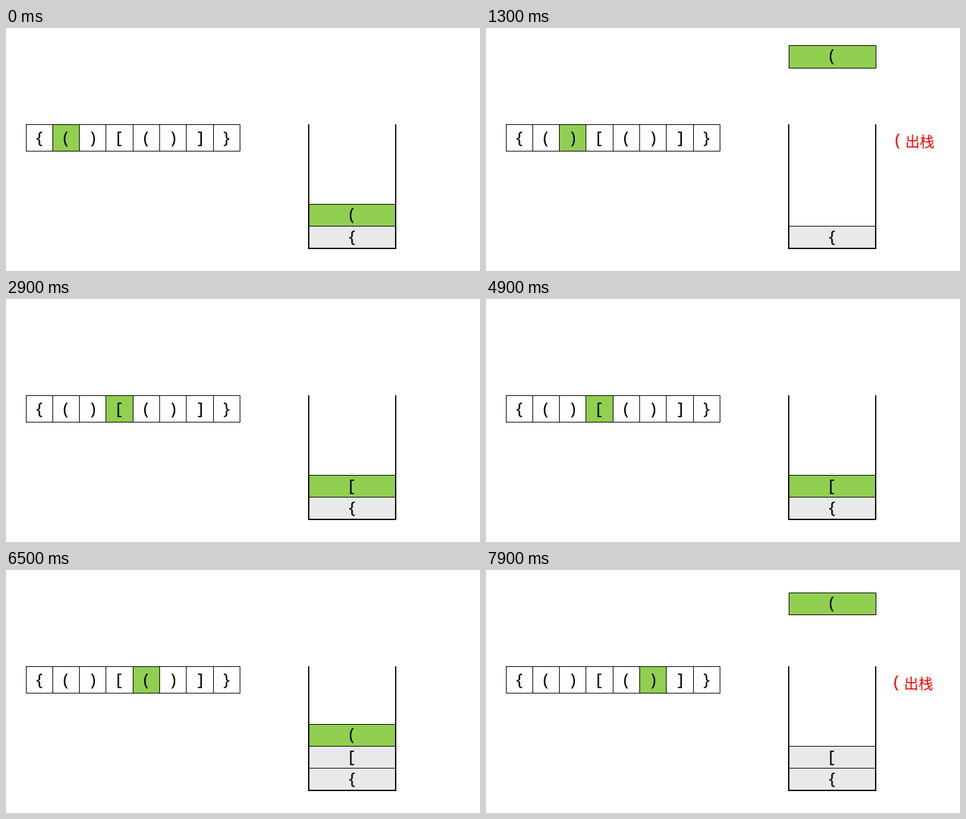
An HTML page with a canvas for the animation above (8000 ms loop, 714x366 px).

```html
<!DOCTYPE html>
<html lang="zh-CN">
<head>
<meta charset="utf-8">
<style>
  html, body { margin: 0; width: 100%; height: 100%; overflow: hidden; background: #fff; }
  canvas { display: block; }
</style>
</head>
<body>
<canvas id="stage" width="714" height="366"></canvas>
<script>
const ctx = document.getElementById('stage').getContext('2d');
const LOOP = 8000, GREEN = '#90cf50', GREY = '#e9e9e9';
const input = '{()[()]}';

// Each step: start time, highlighted input cell, stack (bottom first), popped item
const steps = [
  { at: 0, cell: 1, stack: '{(' },
  { at: 500, cell: 2, stack: '{', popped: '(', top: 26, height: 34, labelX: 620.5 },
  { at: 2900, cell: 3, stack: '{[' },
  { at: 5100, cell: 4, stack: '{[(' },
  { at: 7300, cell: 5, stack: '{[', popped: '(', top: 34, height: 33, labelX: 618.5 },
];

function box(x, y, w, h, fill) {
  ctx.fillStyle = fill;
  ctx.fillRect(x + .5, y + .5, w, h);
  ctx.lineWidth = 1;
  ctx.strokeRect(x + .5, y + .5, w, h);
}

// Centre the visible ink of a bracket on (x, y)
function bracket(char, x, y, color = '#000') {
  ctx.font = '500 26px "Noto Sans", sans-serif';
  ctx.fillStyle = color;
  const m = ctx.measureText(char);
  ctx.fillText(char,
    x + (m.actualBoundingBoxLeft - m.actualBoundingBoxRight) / 2,
    y + (m.actualBoundingBoxAscent - m.actualBoundingBoxDescent) / 2);
}

function drawInput(active) {
  const edge = i => 30 + Math.floor(40.3 * i);
  [...input].forEach((char, i) => {
    box(edge(i), 145, edge(i + 1) - edge(i), 40, i === active ? GREEN : '#fff');
    bracket(char, 50.2 + 40.3 * i, 167);
  });
}

function drawStack({ stack, popped }) {
  [...stack].forEach((char, i) => {
    const y = 298 - 33 * i;
    const isNew = !popped && i === stack.length - 1;
    box(456, y, 130, 33, isNew ? GREEN : GREY);
    bracket(char, 521.3, y + 17.5);
  });
  ctx.lineWidth = 1.8;
  ctx.beginPath();
  ctx.moveTo(456, 145);
  ctx.lineTo(456, 332);
  ctx.lineTo(587, 332);
  ctx.lineTo(587, 145);
  ctx.stroke();
}

function drawPopped({ popped, top, height, labelX }) {
  box(456, top, 131, height, GREEN);
  bracket(popped, 521.3, top + 17.5);
  bracket(popped, labelX, 170.5, '#f00');
  ctx.font = '22px "Noto Sans CJK SC", "Noto Sans CJK", sans-serif';
  ctx.fillText('出栈', labelX + 11, 179);
}

function draw(now) {
  const time = now % LOOP;
  const step = steps.findLast(s => s.at <= time);
  ctx.fillStyle = '#fff';
  ctx.fillRect(0, 0, 714, 366);
  ctx.strokeStyle = '#000';
  drawInput(step.cell);
  drawStack(step);
  if (step.popped) drawPopped(step);
}

const start = performance.now();
(function tick() {
  draw(performance.now() - start);
  requestAnimationFrame(tick);
})();
</script>
</body>
</html>
```
